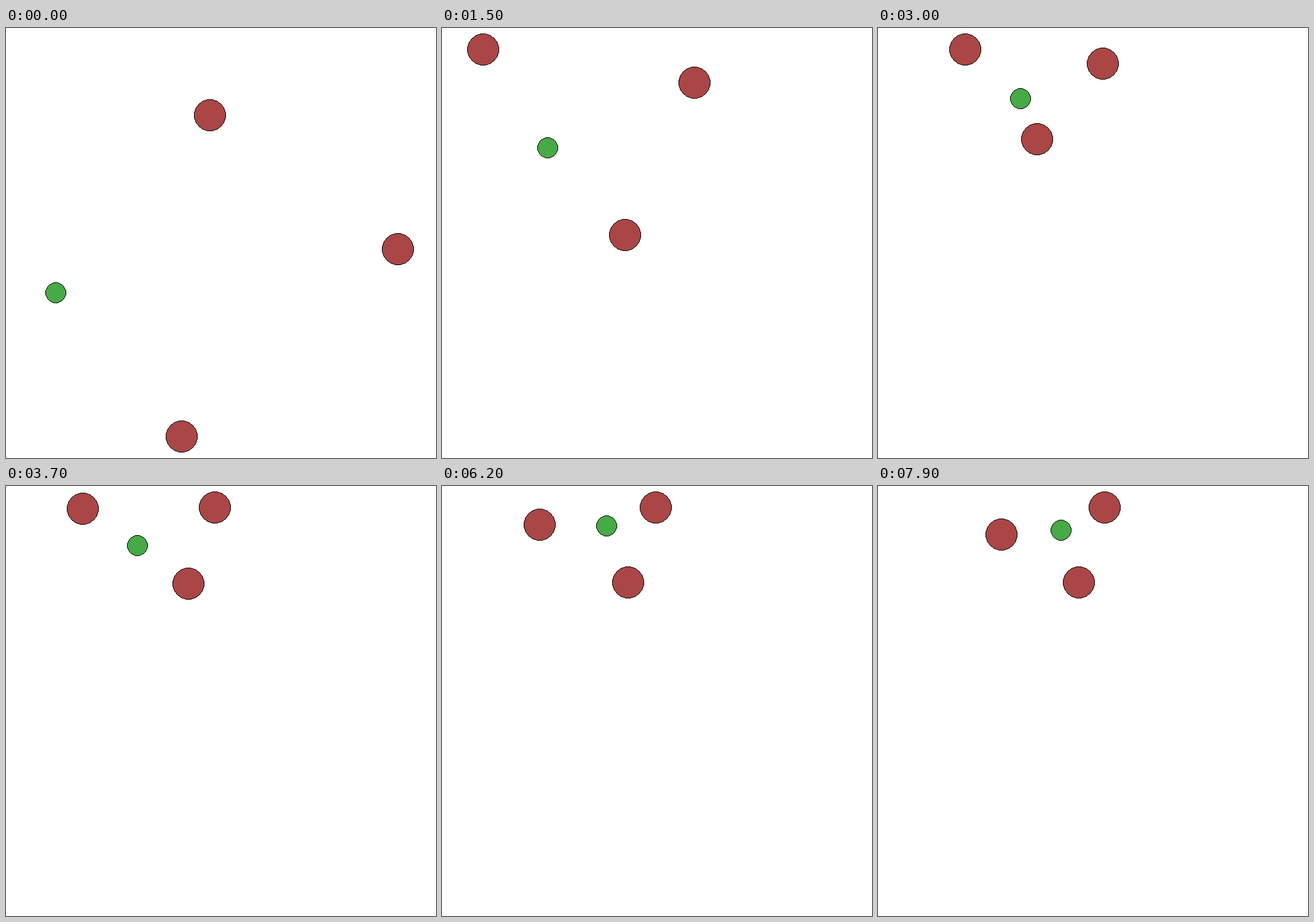
Write an HTML page with a canvas that moves like this. It is 700 by 700 pixels and loops after 8000 ms.

```html
<!DOCTYPE html>
<html lang="en">
<head>
<meta charset="utf-8">
<title>Pursuit</title>
<style>
  html, body { margin: 0; width: 100%; height: 100%; overflow: hidden; background: #fff; }
  canvas { display: block; width: 100vw; height: 100vh; image-rendering: pixelated; }
</style>
</head>
<body>
<canvas width="700" height="700"></canvas>
<script>
const SIZE = 700, LOOP = 8000, STEP = 100, MARGIN = 9;
const ctx = document.querySelector('canvas').getContext('2d');

const chaser = { radius: 26, color: '#aa4646' };
const runner = { radius: 17, color: '#46aa46' };

// Turning points, reached by all four discs at these seconds.
const times = [.1, .8, 1.3, 2.3, 3.7, 4.8, 7.9];
const discs = [
  { ...chaser, path: [[332, 142], [117, 35], [56, 35], [147, 35], [125, 37], [129, 50], [201, 79]] },
  { ...chaser, path: [[638, 360], [595, 160], [430, 96], [396, 84], [340, 35], [334, 35], [369, 35]] },
  { ...chaser, path: [[286, 665], [336, 630], [315, 385], [232, 227], [297, 159], [287, 157], [327, 157]] },
  { ...runner, path: [[81, 431], [119, 272], [153, 212], [242, 140], [214, 97], [242, 65], [298, 72]] }
];

// Smooth curve through the turning points, with slopes taken from the neighbours.
function position(path, axis, t) {
  const last = times.length - 1;
  const slope = i => {
    const a = Math.max(0, i - 1), b = Math.min(last, i + 1);
    return (path[b][axis] - path[a][axis]) / (times[b] - times[a]);
  };
  const i = Math.max(0, times.findLastIndex((time, k) => k < last && time <= t));
  const span = times[i + 1] - times[i];
  const u = Math.max(0, (t - times[i]) / span);
  const from = path[i][axis], to = path[i + 1][axis];
  return from + (to - from) * u * u * (3 - 2 * u)
    + span * u * (1 - u) * (slope(i) * (1 - u) - slope(i + 1) * u);
}

// Half-extents of the rectangles that make up a midpoint circle.
function rectangles(radius) {
  const halves = [];
  let x = 0, y = radius, error = 1 - radius;
  while (x < y) {
    if (error >= 0) error -= 2 * --y;
    error += 2 * ++x + 1;
    halves.push([x, y], [y, x]);
  }
  return halves;
}

function drawDisc(cx, cy, radius, color) {
  const halves = rectangles(radius);
  ctx.fillStyle = color;
  for (const [x, y] of halves) ctx.fillRect(cx - x, cy - y, 2 * x, 2 * y);
  ctx.fillStyle = '#000';
  for (const [x, y] of halves)
    for (const px of [cx - x, cx + x - 1])
      for (const py of [cy - y, cy + y - 1]) ctx.fillRect(px, py, 1, 1);
}

const start = performance.now();

function draw() {
  const elapsed = Math.max(0, performance.now() - start) % LOOP;
  const t = Math.floor(elapsed / STEP) * STEP / 1000;
  ctx.clearRect(0, 0, SIZE, SIZE);
  for (const { radius, color, path } of discs) {
    const wall = MARGIN + radius;
    const [x, y] = [0, 1].map(axis =>
      Math.round(Math.min(SIZE - wall, Math.max(wall, position(path, axis, t)))));
    drawDisc(x, y, radius, color);
  }
  requestAnimationFrame(draw);
}
draw();
</script>
</body>
</html>
```
